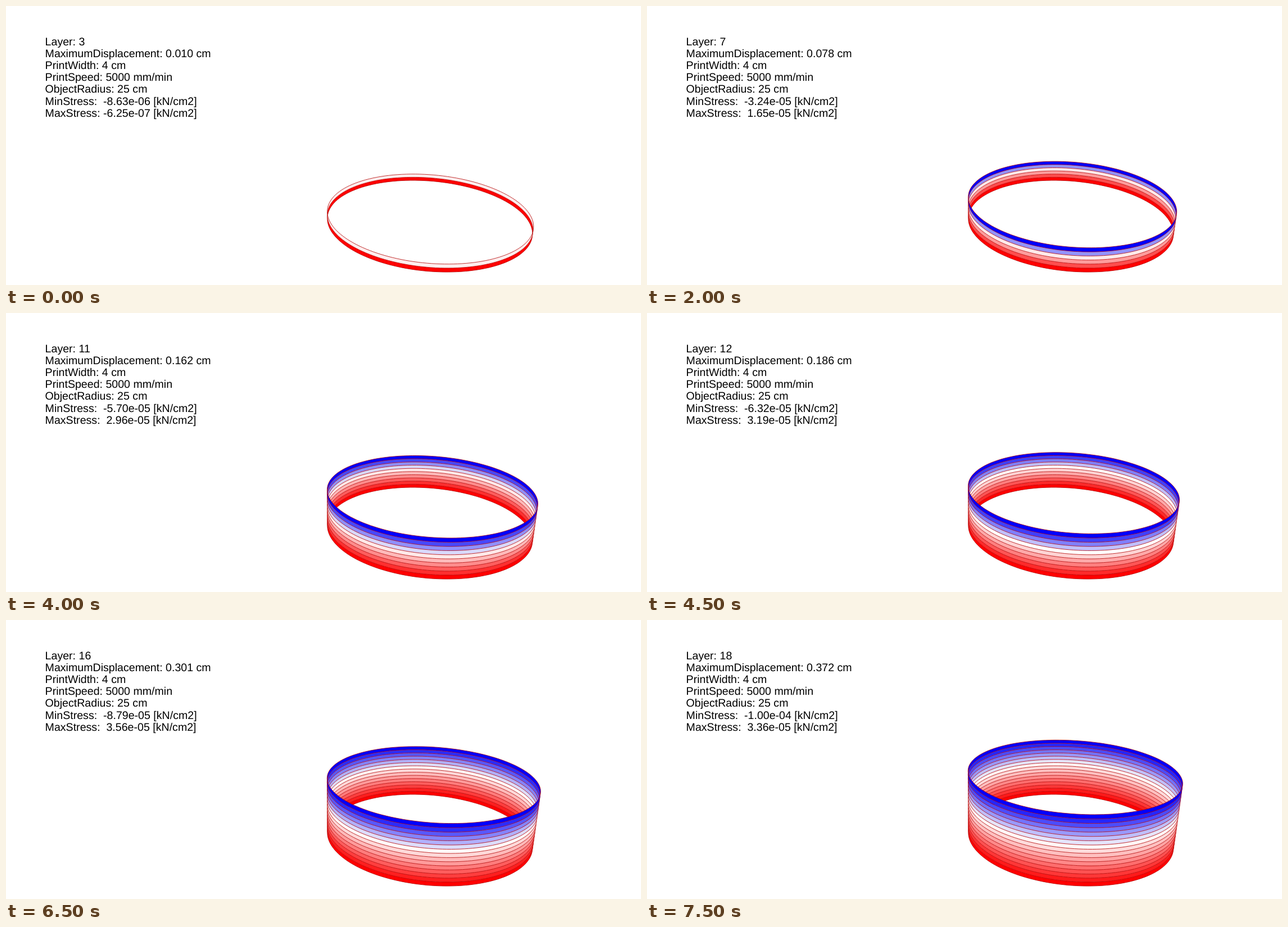
Animation of 1130 by 496 pixels, one loop 8000 ms. Source, as an HTML page:

```html
<!DOCTYPE html>
<html lang="en">
<head>
<meta charset="utf-8">
<title>Layer stress simulation</title>
<style>
  html, body { margin: 0; width: 100%; height: 100%; overflow: hidden; background: #fff; }
  svg { display: block; }
  text {
    font: 19.6px "Liberation Sans", Arial, sans-serif;
    text-rendering: geometricPrecision;
    white-space: pre;
  }
  .ring { fill: none; stroke: #b00000; stroke-width: .8; stroke-linejoin: round; }
</style>
</head>
<body>
<svg width="1130" height="496" viewBox="0 0 1130 496">
  <g id="wall"></g>
  <g id="info"></g>
</svg>
<script>
const STEP_MS = 500, FIRST_LAYER = 3, STEPS = 16;

// One value per layer: displacement in 1e-3 cm, stresses in 1e-6 kN/cm2.
const displacement = [10, 25, 41, 59, 78, 97, 117, 139, 162, 186, 212, 240, 270, 301, 336, 372];
const minStress = [-8.63, -14.5, -20.4, -26.4, -32.4, -38.5, -44.6, -50.8, -57,
  -63.2, -69.4, -75.6, -81.8, -87.9, -94, -100];
const maxStress = [-.625, 4.02, 8.41, 12.6, 16.5, 20.3, 23.7, 26.8, 29.6,
  31.9, 33.7, 35, 35.6, 35.6, 34.9, 33.6];

const wall = document.getElementById('wall');
const info = document.getElementById('info');
const lines = Array.from({ length: 7 }, (_, i) => {
  const line = document.createElementNS('http://www.w3.org/2000/svg', 'text');
  line.setAttribute('x', 69.6);
  line.setAttribute('y', 70.2 + i * 21.07);
  return info.appendChild(line);
});

// Projected circle at height k, as a sheared ellipse.
function ringPoint(k, angle) {
  const left = 571.8 - .03 * k, right = 936.9 + .97 * k;
  const top = 310 - 5.6 * k - .005 * k * k;
  const bottom = 473 - 7.05 * k - .025 * k * k;
  const tilt = .167 + .0004 * k;
  const x = (left + right) / 2 + (right - left) / 2 * Math.cos(angle);
  const y = (top + bottom) / 2 + (bottom - top) / 2 *
    (tilt * Math.cos(angle) + Math.sqrt(1 - tilt * tilt) * Math.sin(angle));
  return x.toFixed(2) + ' ' + y.toFixed(2);
}

function arc(k, from, to) {
  const n = 72;
  return Array.from({ length: n + 1 }, (_, i) => ringPoint(k, from + (to - from) * i / n)).join('L');
}

// Bands first, then every ring line once on top of them.
function halfWall(colors, from, to) {
  const bands = colors.map((color, k) =>
    `<path fill="${color}" d="M${arc(k, from, to)}L${arc(k + 1, to, from)}Z"/>`);
  const rings = [...colors, null].map((_, k) =>
    `<path class="ring" d="M${arc(k, from, to)}"/>`);
  return [...bands, ...rings].join('');
}

// Red at the base, white at the neutral height, blue at the top.
function bandColors(layer) {
  const top = layer - 2;
  const neutral = .55 * top + .52 * (top / top) * (top - 1 + 1) / top;
  return Array.from({ length: top + 1 }, (_, i) => {
    const red = i <= neutral;
    const pale = Math.round(255 * (red ? i / neutral : (top - i) / (top - neutral)));
    return red ? `rgb(255,${pale},${pale})` : `rgb(${pale},${pale},255)`;
  });
}

function stress(value) {
  return (value * 1e-6).toExponential(2).replace(/e-(\d)$/, 'e-0$1') + ' [kN/cm2]';
}

const EDGE = .064; // where the right silhouette touches the rings

function draw(step) {
  const layer = FIRST_LAYER + step, max = maxStress[step];
  const colors = bandColors(layer);
  wall.innerHTML = halfWall(colors, Math.PI, 2 * Math.PI + EDGE) + halfWall(colors, EDGE, Math.PI);
  [
    `Layer: ${layer}`,
    `MaximumDisplacement: ${(displacement[step] / 1000).toFixed(3)} cm`,
    'PrintWidth: 4 cm',
    'PrintSpeed: 5000 mm/min',
    'ObjectRadius: 25 cm',
    `MinStress:  ${stress(minStress[step])}`,
    `MaxStress: ${max < 0 ? '' : ' '}${stress(max)}`
  ].forEach((text, i) => { lines[i].textContent = text; });
}

let shown = -1, start;
function tick(now) {
  start ??= now;
  const step = Math.floor((now - start) / STEP_MS) % STEPS;
  if (step !== shown) draw(shown = step);
  requestAnimationFrame(tick);
}
draw(shown = 0);
requestAnimationFrame(tick);
</script>
</body>
</html>
```
